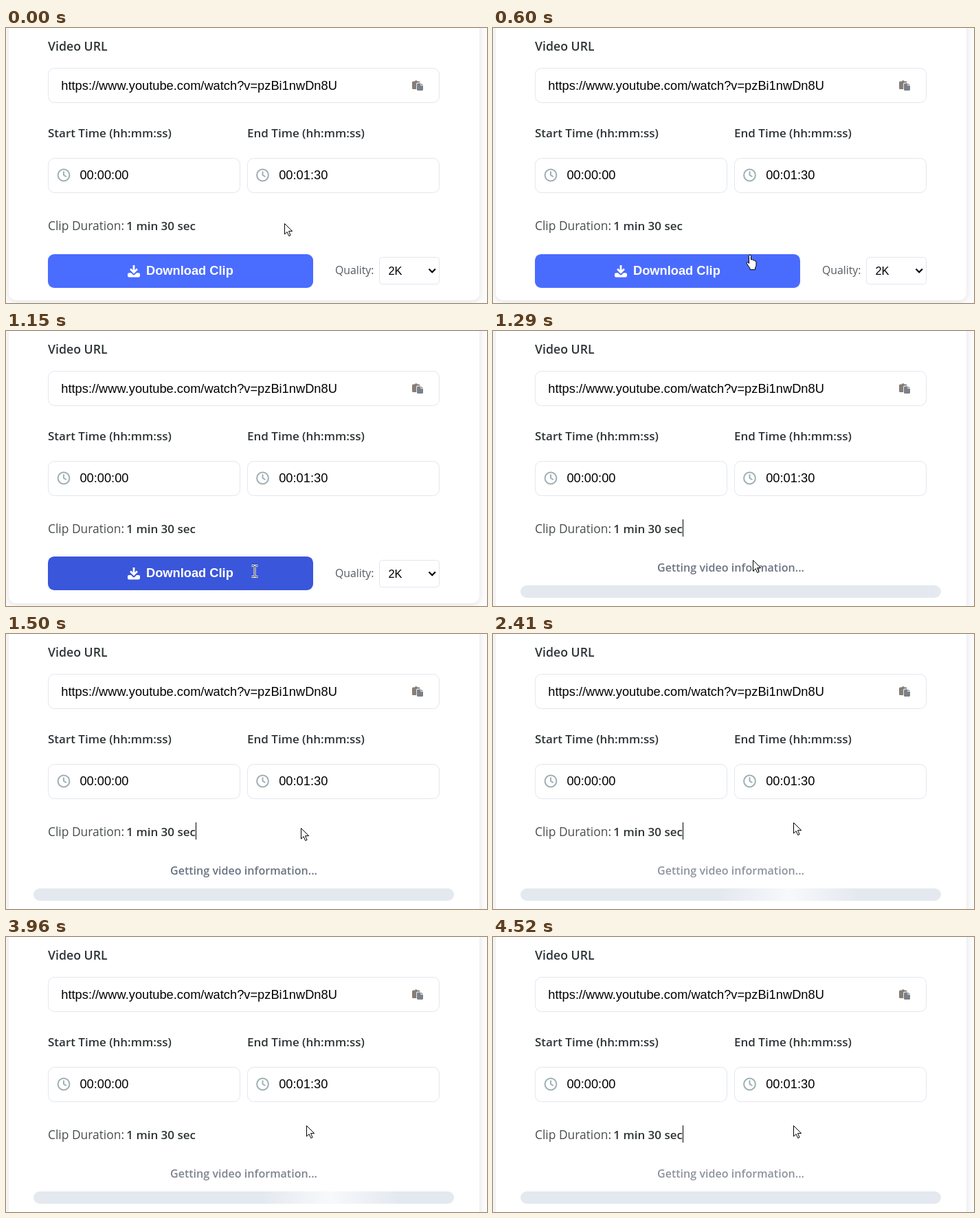
Animation, 700 px wide and 400 px high, one loop 4660 ms. Source, as an HTML page:

```html
<!DOCTYPE html>
<html lang="en">
<head>
<meta charset="utf-8">
<title>Clip downloader</title>
<style>
  html, body { margin: 0; width: 100%; height: 100%; overflow: hidden; background: #fcfcfc; }
  svg { display: block; width: 100%; height: 100%; overflow: hidden; }
  text { font: 17.4px "Open Sans", "Noto Sans", sans-serif; fill: #2d3436; }
  .semi { font-weight: 600; font-size: 17px; }
  .field { font: 18.27px "Liberation Sans", Arial, sans-serif; fill: #000; }
  .box { fill: #fff; stroke: #e3e6ef; }
  .pointer { fill: #fff; stroke: #000; stroke-linejoin: round; }
  #card { fill: #fff; filter: drop-shadow(0 2px 5px rgba(0, 0, 0, .1)); }
</style>
</head>
<body>
<svg viewBox="0 0 700 400">
  <defs>
    <linearGradient id="shine">
      <stop offset="0" stop-color="#f7f9fb" stop-opacity="0"/>
      <stop offset=".5" stop-color="#f7f9fb"/>
      <stop offset="1" stop-color="#f7f9fb" stop-opacity="0"/>
    </linearGradient>
    <clipPath id="track"><rect x="40" y="370" width="612" height="18" rx="9"/></clipPath>
    <g id="clock" fill="none" stroke="#9fb0b4" stroke-width="2" stroke-linecap="round" stroke-linejoin="round">
      <circle r="8.4"/><path d="M0-4.8V0L3.2 1.8"/>
    </g>
    <path id="ibeam" fill="none" d="M-4.5-7.5h3.5l1 1 1-1h3.5M0-7V8M-4.5 8.5h3.5l1-1 1 1h3.5"/>
  </defs>

  <rect id="card" x="4" y="-40" width="685" height="436" rx="11"/>

  <text class="semi" x="61" y="33" style="font-size:17.7px">Video URL</text>
  <rect class="box" x="61.5" y="58.5" width="569" height="50" rx="9"/>
  <text class="field" x="80.3" y="90">https://www.youtube.com/watch?v=pzBi1nwDn8U</text>
  <path fill="#857d78" d="M592.5 77.5h2.3a2.2 2.2 0 0 1 4 0h2.2q1.5 0 1.5 1.5v.5h-3.5q-1.800 0-1.800 1.800V89h-4.700q-1.500 0-1.500-1.500V79q0-1.500 1.500-1.500z"/>
  <path fill="#7b8087" d="M599.5 80.500h4v3.500h3.500v5.500q0 1.500-1.500 1.500h-6q-1.500 0-1.500-1.500v-7.500q0-1.500 1.500-1.500zM604.300 80.500l2.700 2.700h-2.700z"/>

  <text class="semi" x="61" y="159">Start Time (hh:mm:ss)</text>
  <text class="semi" x="351" y="159">End Time (hh:mm:ss)</text>
  <rect class="box" x="61.5" y="189.5" width="279" height="50" rx="9"/>
  <rect class="box" x="351.5" y="189.5" width="279" height="50" rx="9"/>
  <use href="#clock" x="84" y="214"/>
  <use href="#clock" x="373.5" y="214"/>
  <text class="field" x="107.4" y="220">00:00:00</text>
  <text class="field" x="397.2" y="220">00:01:30</text>

  <text x="61" y="294" fill-opacity=".88">Clip Duration:</text>
  <text class="semi" x="175.3" y="294">1 min 30 sec</text>
  <path id="caret" d="M276.5 274v25" stroke="#000"/>

  <g id="form">
    <g id="button">
      <rect id="face" x="61" y="329" width="386" height="49" rx="9"/>
      <path fill="#fff" d="M184.600 345h2.800v7.200l2.600-2.600 1.900 1.900-5.900 5.900-5.900-5.900 1.900-1.900 2.600 2.600zM179 356.200h3l2.600 2.600q1.400 1.300 2.800 0l2.600-2.600h3q2 0 2 2v2.300q0 2-2 2h-14q-2 0-2-2v-2.300q0-2 2-2z"/>
      <text class="field" x="204" y="359" style="font-weight:700;fill:#fff">Download Clip</text>
    </g>
    <text x="479" y="358" style="font-size:15.8px;fill:#555b61">Quality:</text>
    <rect class="box" x="543.5" y="333.5" width="87" height="39" rx="4"/>
    <text class="field" x="556.5" y="359" style="font-size:16.4px">2K</text>
    <path d="M615.5 350.5l4.7 4.7 4.7-4.7" fill="none" stroke="#000" stroke-width="2.2"/>
  </g>

  <g id="progress">
    <text id="status" class="semi" x="346" y="350" text-anchor="middle" style="font-size:16.1px;fill:#6b7280">Getting video information...</text>
    <g clip-path="url(#track)">
      <rect x="40" y="370" width="612" height="18" fill="#e4e9f0"/>
      <rect id="glow" y="370" width="200" height="18" fill="url(#shine)"/>
    </g>
  </g>

  <g id="cursor">
    <path id="arrow" class="pointer" d="M.5.5v15.5l3.6-3.4 2.6 5.9 2.4-1-2.6-5.9h5.2z"/>
    <path id="hand" class="pointer" d="M-1.5 1.5q0-1.5 1.5-1.5t1.5 1.5v5.5q2.5-1 3 .8 2-.6 2.5 1 2-.3 2 1.7v4.5q0 2-1.5 4v2.5h-7.5v-2l-4.5-6.5q-1.5-2.5.5-2.5 1 0 2.5 2z"/>
    <g id="beam">
      <use href="#ibeam" stroke="#fff" stroke-width="3"/>
      <use href="#ibeam" stroke="#222"/>
    </g>
  </g>
</svg>
<script>
const LOOP = 4660, TICK = 69.8, MOVE = 450, SUBMIT = 1215;
const el = id => document.getElementById(id);
const show = (id, on) => el(id).style.display = on ? "" : "none";
const ramp = (t, from, to) => Math.min(1, Math.max(0, (t - from) / (to - from)));
const smooth = p => p * p * (3 - 2 * p);
const mix = (a, b, p) => a + (b - a) * p;

function pointerAt(t) {
  if (t < MOVE) return [405, 284, "arrow"];
  const step = MOVE + Math.floor((t - MOVE) / TICK) * TICK;
  if (t < SUBMIT) {
    const p = smooth(ramp(step, 390, 700)), y = mix(284, 349, p);
    return [mix(405, 362, p), y, t >= 1145 ? "beam" : y > 329 ? "hand" : "arrow"];
  }
  const p = ramp(step, 1220, 1528), y = mix(350, 274, p);
  return [mix(362, 437, p), y, y > 338 ? "beam" : "arrow"];
}

function draw(now) {
  const t = now % LOOP, busy = t >= SUBMIT;
  show("form", !busy);
  show("progress", busy);
  el("card").setAttribute("height", busy ? 500 : 436);

  const hover = smooth(ramp(t, 580, 880));
  const rgb = [[74, 58], [108, 86], [255, 218]].map(([a, b]) => Math.round(mix(a, b, hover)));
  el("face").setAttribute("fill", `rgb(${rgb})`);
  el("button").setAttribute("transform", `translate(0 ${-1.1 * hover})`);

  show("caret", busy && Math.floor((t - 1145) / 561.5) % 2 === 0);
  el("status").setAttribute("opacity", 0.88 + 0.12 * Math.cos((t - 1450) / 1000 * Math.PI));
  const sweep = ((t - 1557 + 1500) % 1500) / 1500;
  el("glow").setAttribute("x", mix(-266, 958, sweep) - 100);

  const [x, y, shape] = pointerAt(t);
  for (const id of ["arrow", "hand", "beam"]) show(id, id === shape);
  el("cursor").setAttribute("transform", `translate(${Math.round(x)} ${Math.round(y)})`);
  requestAnimationFrame(draw);
}
requestAnimationFrame(draw);
</script>
</body>
</html>
```
